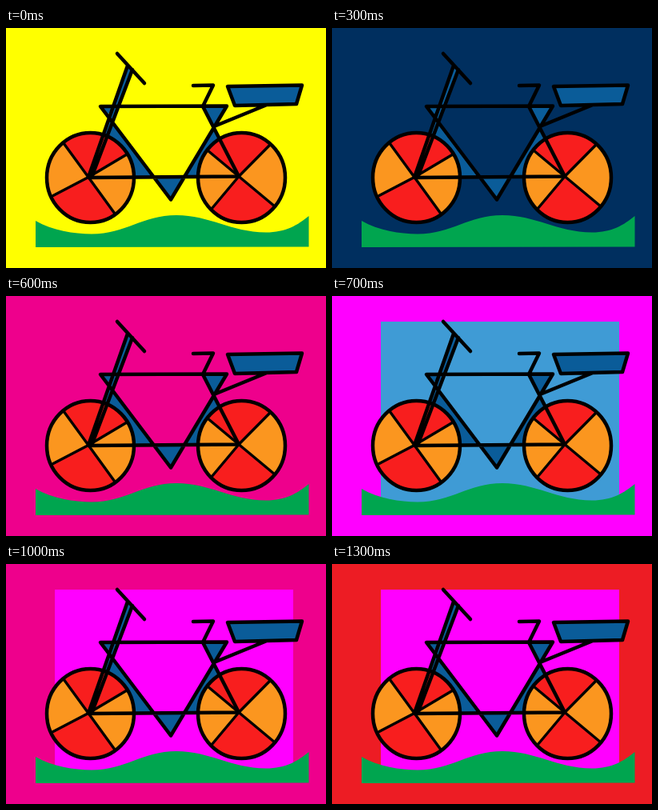
Animation of 400 by 300 pixels, one loop 1400 ms. Source, as an HTML page:

```html
<!DOCTYPE html>
<html lang="en">
<head>
<meta charset="utf-8">
<title>Bicycle</title>
<style>
  html, body { margin: 0; height: 100%; overflow: hidden; }
  svg { display: block; width: 100vw; height: 100vh; }
  .blue { fill: #0a5c99; }
  .red { fill: #f81e1e; }
  .tyre { fill: #fb961f; }
  .line { fill: none; stroke: #000; stroke-width: 4.5; stroke-linecap: round; stroke-linejoin: round; }
  .spoke { stroke-width: 3.4; }
</style>
</head>
<body>
<svg viewBox="0 0 400 300" preserveAspectRatio="none">
  <rect id="back" width="400" height="300"/>
  <rect id="panel" x="61" y="32" width="298" height="226"/>
  <path fill="#00a54f" d="M37 241C58 253 85 257.5 107 257.5C150 257.5 170 234 213 234C255 234 280 255 325 255.5C350 255.5 365 246 378.5 235V273.5L37 274Z"/>

  <!-- frame fills, partly covered by the wheels -->
  <path class="blue" d="M152 47L159 52L108 184L103 186ZM133 118L186 186H104ZM260 122L224 186H291ZM187 187H223L206 215ZM118 98H134L127 109ZM246 98H276L260 122Z"/>

  <!-- wheels -->
  <g class="tyre">
    <ellipse cx="105.5" cy="187" rx="54.5" ry="56"/>
    <ellipse cx="294.5" cy="187" rx="54.5" ry="56"/>
  </g>
  <path class="red" d="M103 186.5L71.5 143.5A54.5 56 0 0 1 152 157.5ZM103 186.5L137 233A54.5 56 0 0 1 57 212Z"/>
  <path class="red" d="M291 185.5L251.5 153A54.5 56 0 0 1 331 145ZM291 185.5L336 223A54.5 56 0 0 1 256 227Z"/>
  <path class="line spoke" d="M72 144L103 186.5L136 232M58 210L103 186.5L151 158M252 153L291 185.5L336 223M330 146L291 185.5L257 226"/>
  <g class="line">
    <ellipse cx="105.5" cy="187" rx="54.5" ry="56"/>
    <ellipse cx="294.5" cy="187" rx="54.5" ry="56"/>
  </g>

  <!-- fork, basket and tubes -->
  <path class="blue" d="M277 73L370 71.5L363 95L286 97Z"/>
  <path class="line" d="M139 32L173 69M152 47L103 186.5M158 52L108 184M118 98L276 97.5L206 214.5ZM103 187L291 185.5L246 98L259 71.5L234 72M260 123L326 96M277 73L370 71.5L363 95L286 97Z"/>
</svg>
<script>
  const yellow = '#ffff00', magenta = '#ff00ff', sky = '#3f9bd5',
        navy = '#002f5f', pink = '#ee008c', red = '#ed1c24';
  const step = 100;

  // [background, panel]; no panel when the second is missing
  const scenes = [
    [yellow], [magenta, sky], [yellow, magenta],
    [navy], [magenta, sky], [navy, magenta],
    [pink], [magenta, sky], [pink],
    [magenta, sky], [pink, magenta], [magenta, sky],
    [red], [red, magenta]
  ];
  const back = document.getElementById('back');
  const panel = document.getElementById('panel');
  const start = performance.now();

  function draw() {
    const time = Math.max(0, performance.now() - start);
    const [outer, inner = 'none'] = scenes[Math.floor(time / step) % scenes.length];
    back.setAttribute('fill', outer);
    panel.setAttribute('fill', inner);
    requestAnimationFrame(draw);
  }
  draw();
</script>
</body>
</html>
```
